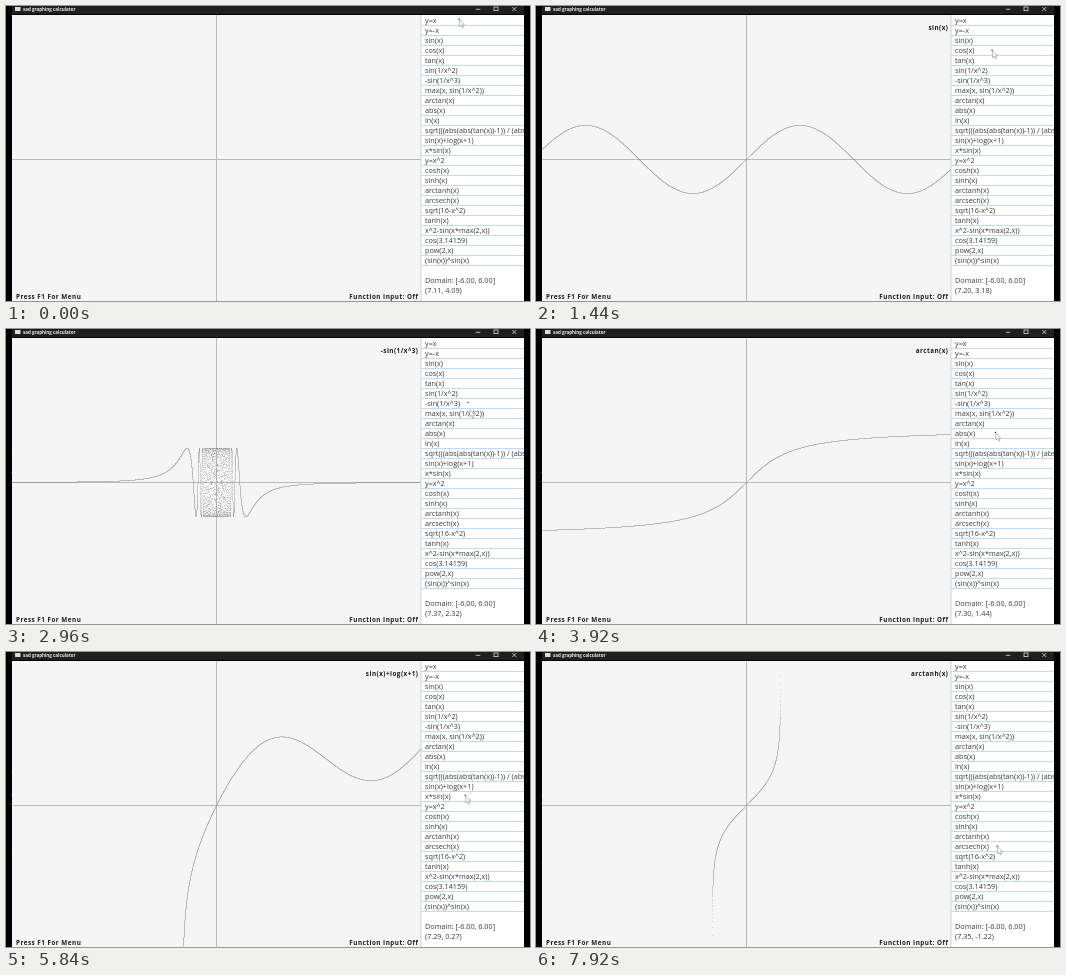
Recreate the animation shown at these times as an HTML page with a canvas. Size 524 by 295 pixels, loop 8 s.

```html
<!DOCTYPE html>
<html lang="en">
<head>
<meta charset="utf-8">
<title>sad graphing calculator</title>
<style>
html, body { margin: 0; width: 100%; height: 100%; overflow: hidden; background: #000; }
#stage { position: relative; width: 524px; height: 295px; overflow: hidden; }
canvas, svg { position: absolute; left: 0; top: 0; display: block; }
text { font-family: "Open Sans", "Noto Sans", sans-serif; white-space: pre; }
.row { font-size: 7.25px; fill: #3a3a3a; }
.tag { font-size: 6.3px; font-weight: 700; letter-spacing: .5px; fill: #1a1a1a; }
.title { font-size: 4.5px; font-weight: 700; fill: #eee; }
</style>
</head>
<body>
<div id="stage">
  <canvas id="plot" width="524" height="295"></canvas>
  <svg id="ui" width="524" height="295" viewBox="0 0 524 295">
    <defs><clipPath id="side"><rect x="414" y="9" width="104" height="286"/></clipPath></defs>
    <rect x="6" y="0" width="512" height="8" fill="#1f1f1f"/>
    <rect x="9" y="1" width="5.5" height="4" fill="#ddd"/>
    <text class="title" x="17" y="4.7">sad graphing calculator</text>
    <g fill="none" stroke="#ddd" stroke-width=".8">
      <path d="M469.8 3.3h4.5M506.3 1l4 4m0-4l-4 4"/>
      <rect x="488" y="1" width="4" height="3.6"/>
    </g>
    <g id="list" clip-path="url(#side)"></g>
    <text class="tag" x="10" y="292.6">Press F1 For Menu</text>
    <text class="tag" x="412.5" y="292.6" text-anchor="end">Function Input: Off</text>
    <text class="tag" id="label" x="412.5" y="24.4" text-anchor="end"></text>
    <text class="row" x="419" y="276.8">Domain: [-6.00, 6.00]</text>
    <text class="row" id="coords" x="419" y="287"></text>
    <path id="arrow" d="M0 0V7.2L1.7 5.7L2.9 8.3L4 7.8L2.9 5.3H5.1Z" fill="#fff" stroke="#777" stroke-width=".5"/>
    <rect id="dot" width="1.2" height="1.2" fill="#222"/>
  </svg>
</div>
<script>
const LOOP = 8000, STEP = 80;
const CX = 210.5, CY = 153, UNIT = 34.1;
const { sin, cos, tan, abs, sqrt, log, max } = Math;

// Listed text, plotted function, click time
const entries = [
  ["y=x", x => x, 240],
  ["y=-x", x => -x, 640],
  ["sin(x)", sin, 1040],
  ["cos(x)", cos, 1520],
  ["tan(x)", tan, 1920],
  ["sin(1/x^2)", x => sin(1 / x ** 2), 2320],
  ["-sin(1/x^3)", x => -sin(1 / x ** 3), 2720],
  ["max(x, sin(1/x^2))", x => max(x, sin(1 / x ** 2)), 3200],
  ["arctan(x)", Math.atan, 3600],
  ["abs(x)", abs, 4000],
  ["ln(x)", log, 4560],
  ["sqrt(((abs(abs(tan(x))-1)) / (abs(x))))", x => sqrt(abs(abs(tan(x)) - 1) / abs(x)), 5120],
  ["sin(x)+log(x+1)", x => sin(x) + log(x + 1), 5520],
  ["x*sin(x)", x => x * sin(x), 5920],
  ["y=x^2", x => x * x, 6320],
  ["cosh(x)", Math.cosh, 6800],
  ["sinh(x)", Math.sinh, 7200],
  ["arctanh(x)", Math.atanh, 7600],
  ["arcsech(x)", x => Math.acosh(1 / x), 8000],
  ["sqrt(16-x^2)"], ["tanh(x)"], ["x^2-sin(x*max(2,x))"],
  ["cos(3.14159)"], ["pow(2,x)"], ["(sin(x))^sin(x)"]
];

// Pointer path: row, x, y in graph units
const path = [
  [0, 7.11, 4.09], [3, 7.2, 3.18], [6, 7.37, 2.32], [7, 7.44, 2.02],
  [9, 7.3, 1.44], [11, 7.31, .87], [15, 7.28, -.33], [18, 7.35, -1.22]
];

const $ = id => document.getElementById(id);
const ctx = $("plot").getContext("2d");

function add(tag, attrs, text = "") {
  const el = document.createElementNS("http://www.w3.org/2000/svg", tag);
  for (const k in attrs) el.setAttribute(k, attrs[k]);
  el.textContent = text;
  $("list").append(el);
}

function buildList() {
  add("rect", { x: 415, y: 9, width: 103, height: 286, fill: "#fff" });
  entries.forEach(([name], i) => {
    const y = 10 * i;
    add("rect", { x: 415, y: y + 19, width: 103, height: 1, fill: "#bfdcf2" });
    add("text", { class: "row", x: 419, y: y + 17 }, name);
  });
  add("rect", { x: 414.5, y: 9, width: 1, height: 286, fill: "#c4d6e4" });
}

function drawPlot(f) {
  ctx.fillStyle = "#f5f5f5";
  ctx.fillRect(6, 9, 512, 286);
  ctx.fillStyle = "#b9b9b9";
  ctx.fillRect(6, 153, 409, 1);
  ctx.fillRect(210, 9, 1, 286);
  if (!f) return;

  // One grey dot per sample, snapped to a half-pixel grid so flat runs stay thin
  const grid = .5, snap = v => Math.floor(v / grid) * grid;
  ctx.fillStyle = "#777";
  let lastX, lastY;
  for (let i = -10000; i <= 10000; i++) {
    const x = i * .0006;
    const px = snap(CX + x * UNIT), py = snap(CY + .5 - f(x) * UNIT);
    if (!(py >= 9 && py < 295) || (px === lastX && py === lastY)) continue;
    ctx.fillRect(px, py, grid, grid);
    lastX = px;
    lastY = py;
  }
}

// Rest on a row, then glide to the next one shortly before its click
function rowAt(t) {
  let row = 0;
  for (let i = 1; i <= 18; i++) {
    const p = (t - entries[i][2] + 240) / 120;
    row += Math.min(1, Math.max(0, p));
  }
  return row;
}

function pointer(t) {
  const row = rowAt(t);
  let i = 0;
  while (i < path.length - 2 && path[i + 1][0] <= row) i++;
  const a = path[i], b = path[i + 1], k = (row - a[0]) / (b[0] - a[0]);
  return [a[1] + (b[1] - a[1]) * k, a[2] + (b[2] - a[2]) * k];
}

const place = (el, [x, y], dx, dy) =>
  el.setAttribute("transform", `translate(${CX + x * UNIT + dx} ${CY - y * UNIT + dy})`);

let shown = null, lastT = -1;
function render(time) {
  const t = Math.floor((time % LOOP) / STEP) * STEP;
  if (t === lastT) return;
  lastT = t;
  const current = entries.filter(e => e[2] <= t).length - 1;
  if (current !== shown) {
    shown = current;
    const [name, f] = entries[current] || [""];
    drawPlot(f);
    $("label").textContent = name;
  }
  const pos = pointer(t);
  place($("dot"), pos, -.6, -1.1);
  place($("arrow"), pointer(t + STEP), .4, 0);
  $("coords").textContent = `(${pos.map(v => v.toFixed(2)).join(", ")})`;
}

buildList();
const start = performance.now();
function tick() {
  render(performance.now() - start);
  requestAnimationFrame(tick);
}
tick();
</script>
</body>
</html>
```
